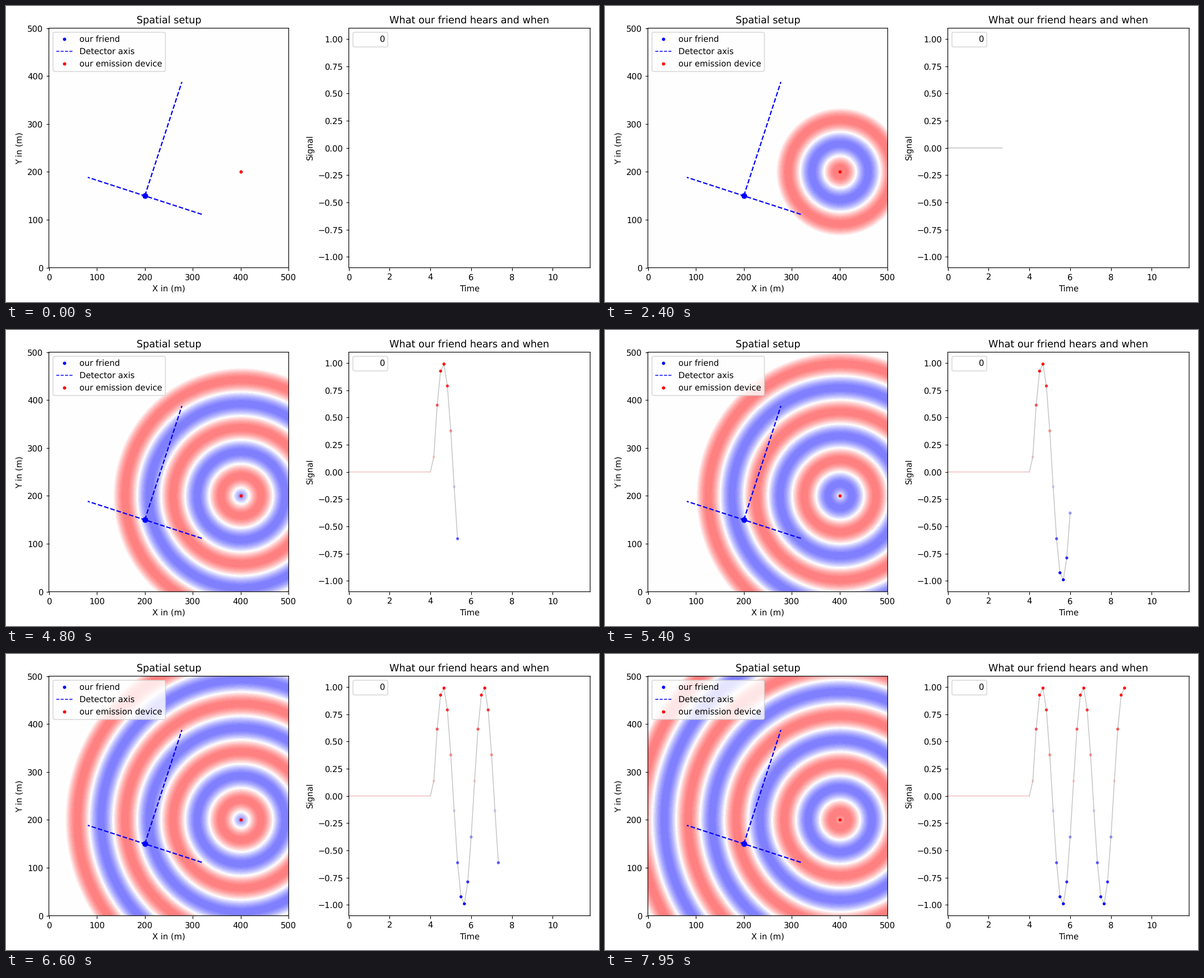
Recreate the animation shown at these times as a matplotlib script. Size 1058 by 529 pixels, loop 8 s.

```python
import numpy as np
import matplotlib.pyplot as plt
from matplotlib.animation import FuncAnimation
from matplotlib.lines import Line2D

W, H, DPI = 1058, 529, 105.8
TICK_MS, TICKS_PER_STEP, LOOP_MS = 50, 3, 8000
SPEED, OMEGA = 50, np.pi
DT = 1 / 6
FRIEND, DEVICE = np.array([200, 150]), np.array([400, 200])
TILT = np.radians(72)
GRID = 428

# Soft rendering: lines and glyphs keep their true sub-pixel size.
plt.rcParams.update({"font.family": "DejaVu Sans", "font.size": 10,
                     "path.snap": False, "text.hinting": "none"})


def emitted(t, r):
    """Sine wave at distance r, zero before the front arrives."""
    delay = t - r / SPEED
    return np.where(delay > 0, np.sin(OMEGA * delay), 0.0)


def banded(v):
    return np.clip(np.round(v * 9.5) / 9, -1, 1)


def add_axes(x0, y0, x1, y1, title, xlabel, ylabel):
    ax = fig.add_axes([x0 / W, 1 - y1 / H, (x1 - x0) / W, (y1 - y0) / H])
    ax.set_title(title)
    ax.set_xlabel(xlabel)
    ax.set_ylabel(ylabel)
    return ax


fig = plt.figure(figsize=(W / DPI, H / DPI), dpi=DPI, facecolor="white")
space = add_axes(76.5, 39.6, 504.4, 467.7, "Spatial setup", "X in (m)", "Y in (m)")
sound = add_axes(611.6, 39.6, 1042.2, 467.7, "What our friend hears and when", "Time", "Signal")

# Spatial panel
coords = (np.arange(GRID) + 0.5) * 500 / GRID
radius = np.hypot(coords[None, :] - DEVICE[0], coords[:, None] - DEVICE[1])
wave = space.imshow(np.zeros((GRID, GRID)), extent=(0, 500, 0, 500), origin="lower",
                    cmap="bwr", vmin=-1, vmax=1, alpha=0.5,
                    interpolation="bilinear", aspect="auto")

along = np.array([np.cos(TILT), np.sin(TILT)])
across = np.array([np.sin(TILT), -np.cos(TILT)])
for a, b in ((FRIEND, FRIEND + 250 * along),
             (FRIEND + 125 * across, FRIEND - 125 * across)):
    space.plot([a[0], b[0]], [a[1], b[1]], "b--", lw=1.5)
space.plot(*FRIEND, "bo")
space.plot(*DEVICE, "r.")
space.set(xlim=(0, 500), ylim=(0, 500),
          xticks=range(0, 501, 100), yticks=range(0, 501, 100))
space.legend(handles=[
    Line2D([], [], color="b", marker=".", ls="none", label="our friend"),
    Line2D([], [], color="b", ls="--", lw=1, label="Detector axis"),
    Line2D([], [], color="r", marker=".", ls="none", label="our emission device"),
], loc="upper left")

# Signal panel
times = np.arange(72) * DT
heard = emitted(times, np.hypot(*(DEVICE - FRIEND)))
first = np.flatnonzero(heard)[0]
tints = np.zeros((len(times), 4))
tints[:, 0] = heard > 0
tints[:, 2] = heard < 0
tints[:, 3] = np.abs(heard)

silence, = sound.plot([], [], lw=1)
trace, = sound.plot([], [], lw=1, color="#c4c4c4")
dots = sound.scatter([], [], s=13.5, linewidths=0, zorder=3)
sound.set(xlim=(0, times[-1]), ylim=(-1.1, 1.1), xticks=range(0, 11, 2))
sound.legend(handles=[Line2D([], [], ls="none", label="0")], loc="upper left")


def update(tick):
    t = tick // TICKS_PER_STEP * DT
    wave.set_data(banded(emitted(t, radius)))

    # Truncation makes the trace lag one sample at a few steps.
    end = int(t / DT) + 1
    quiet = min(end, first)
    silence.set_data(times[:quiet], np.zeros(quiet))
    silence.set_color("#f0bcbc" if end > first else "#bfbfbf")
    trace.set_data(times[first - 1:end], heard[first - 1:end])
    dots.set_offsets(np.column_stack([times[first:end], heard[first:end]]))
    dots.set_facecolors(tints[first:end])
    return wave, silence, trace, dots


anim = FuncAnimation(fig, update, frames=LOOP_MS // TICK_MS, interval=TICK_MS,
                     repeat=True, repeat_delay=0, blit=False)
plt.show()
```
